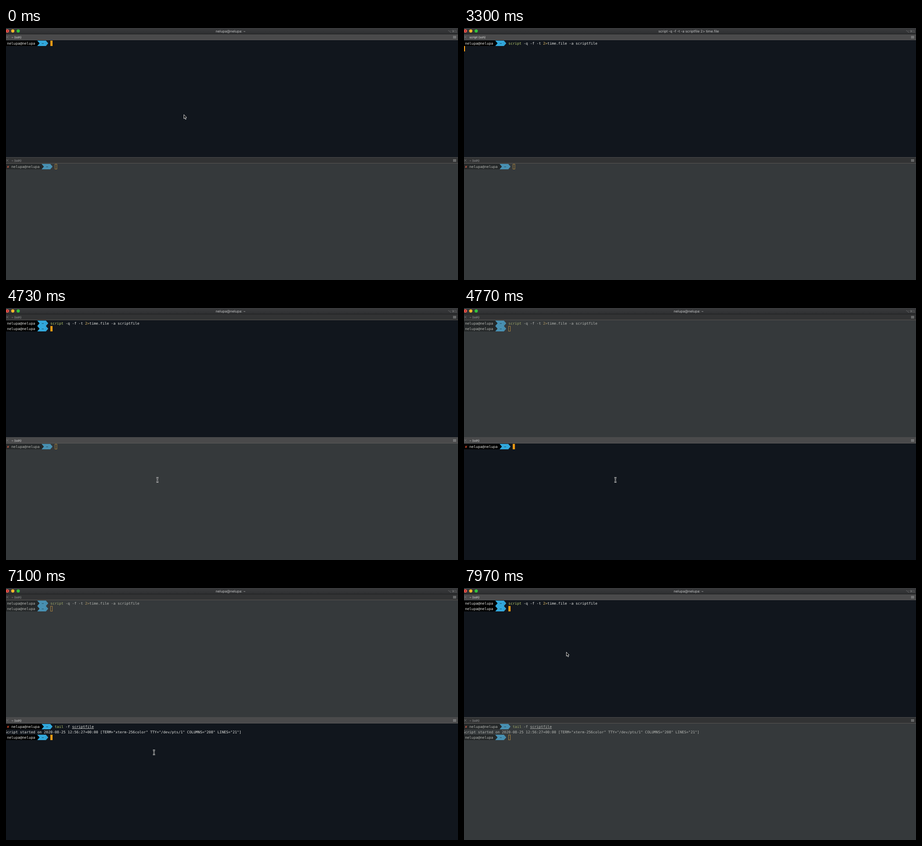
An HTML page with a canvas for the animation above (8000 ms loop, 1000 px wide and 560 px high).

```html
<!DOCTYPE html>
<html lang="en">
<head>
<meta charset="utf-8">
<title>Terminal session</title>
<style>
  html, body { margin: 0; width: 100%; height: 100%; overflow: hidden; background: #11161d; }
  canvas { display: block; width: 1000px; height: 560px; }
</style>
</head>
<body>
<canvas id="stage"></canvas>
<script>
const W = 1000, H = 560, LOOP = 8000;
const CELL = 4.8, ROW = 12, LEFT = -2.6;
const MONO = '7.97px "DejaVu Sans Mono", monospace';
const UI = 'Inter, sans-serif';
const HOST = 'nelupa@nelupa';
const TAIL = 'tail -f scriptfile';
const HEADER = 'Script started on 2020-08-25 12:56:27+00:00 ' +
  '[TERM="xterm-256color" TTY="/dev/pts/1" COLUMNS="208" LINES="21"]';

const LIT = { bg: '#11161d', seg: '#000', blue: '#32a8dc', text: '#e6e7e4', tilde: '#0a1a22',
  cmd: '#b9cd6c', bad: '#e2502f', redir: '#e3bd68', cursor: '#f59c14' };
const DIM = { bg: '#35393b', seg: '#242728', blue: '#4890b2', text: '#b6b8b4', tilde: '#15262f',
  cmd: '#9ea868', bad: '#c5604a', redir: '#b39a62', cursor: '#a58040' };

// Moments of the session, in ms
const T = { hide: 430, recall: 2100, run: 3000, prompt: 3650, show: 4230, arrive: 4690,
  tabDown: 4700, paneDown: 4770, type: 5180, typed: 6200, enter: 6530, output: 6570,
  back: 6970, rest: 7780, paneUp: 7960 };

const canvas = document.getElementById('stage');
const ratio = window.devicePixelRatio || 1;
canvas.width = W * ratio;
canvas.height = H * ratio;
const g = canvas.getContext('2d');
g.scale(ratio, ratio);
g.textRendering = 'geometricPrecision';

const colX = col => LEFT + col * CELL;

function rect(x, y, w, h, color) {
  g.fillStyle = color;
  g.fillRect(x, y, w, h);
}

function poly(points, color) {
  g.fillStyle = color;
  g.beginPath();
  points.forEach(([x, y]) => g.lineTo(x, y));
  g.closePath();
  g.fill();
}

function label(str, x, y, size, color, align = 'left', family = UI) {
  g.font = size + 'px ' + family;
  g.textAlign = align;
  g.fillStyle = color;
  g.fillText(str, x, y);
}

function put(str, col, y, color) {
  g.font = MONO;
  g.textAlign = 'left';
  g.fillStyle = color;
  [...str].forEach((ch, i) => { if (ch !== ' ') g.fillText(ch, colX(col + i), y + 9); });
}

// Draws a prompt and returns the column where input starts
function prompt(y, c, failed) {
  const name = failed ? 3 : 1, edge = name + 14;
  const x = colX(edge), end = colX(edge + 4);
  rect(0, y, x, ROW, c.seg);
  rect(x, y, end - x, ROW, c.blue);
  poly([[x - .3, y], [x + CELL, y + ROW / 2], [x - .3, y + ROW]], c.seg);
  poly([[end - .3, y], [end + CELL, y + ROW / 2], [end - .3, y + ROW]], c.blue);
  if (failed) put('✘', 1, y, c.bad);
  put(HOST, name, y, c.text);
  put('~', edge + 2, y, c.tilde);
  return edge + 6;
}

function cursor(col, y, c) {
  if (c === LIT) return rect(colX(col), y, CELL, ROW, c.cursor);
  g.strokeStyle = c.cursor;
  g.lineWidth = 1;
  g.strokeRect(Math.round(colX(col)) + .5, y + .5, 4, ROW - 1);
}

function titleBar(t) {
  const fill = g.createLinearGradient(0, 0, 0, 13);
  fill.addColorStop(0, '#3a3b3d');
  fill.addColorStop(1, '#2e2f31');
  rect(0, 0, W, 13, fill);
  rect(0, 13, W, 1, '#1d1e1f');
  ['#f4574f', '#f6b62c', '#32c23c'].forEach((color, i) => {
    g.fillStyle = color;
    g.beginPath();
    g.arc(3 + i * 12, 6.6, 3.6, 0, 7);
    g.fill();
  });
  g.fillStyle = '#5c0f0c';
  g.beginPath();
  g.arc(3, 6.6, 1.2, 0, 7);
  g.fill();
  const running = t >= T.run && t < T.prompt;
  label(running ? 'script -q -f -t -a scriptfile 2> time.file' : HOST + ': ~',
    497, 9.5, 7.7, '#c3c4c5', 'center');
  label('⌥⌘1', 998, 9.5, 7.4, '#7b7c7d', 'right', '"DejaVu Sans", sans-serif');
}

function tabBar(y, name, active) {
  rect(0, y, W, 12, active ? '#4a4a4b' : '#323334');
  rect(0, y + 12, W, 1, active ? '#5c5b5a' : '#5a5653');
  const mid = y + 6.3;
  g.strokeStyle = '#7c7d7e';
  g.lineWidth = .8;
  g.beginPath();
  g.moveTo(.3, mid - 2.6); g.lineTo(5.4, mid + 2.6);
  g.moveTo(5.4, mid - 2.6); g.lineTo(.3, mid + 2.6);
  g.stroke();
  label(name + ' (ssh)', 12, y + 8.8, 6.7, active ? '#ededed' : '#a9aaab');
  for (let i = -1; i < 2; i++) rect(989, mid - .4 + i * 2, 7, .9, '#a2a3a4');
}

function upperPane(t, c) {
  rect(0, 27, W, 260, c.bg);
  const y = 28;
  const col = prompt(y, c, false);
  if (t < T.recall) return cursor(col, y, c);
  put('script', col, y, c.cmd);
  put('-q -f -t', col + 7, y, c.text);
  put('2>', col + 16, y, c.redir);
  put('time.file -a scriptfile', col + 18, y, c.text);
  if (t < T.run) cursor(col + 41, y, c);
  else if (t < T.prompt) cursor(0, y + ROW, c);
  else cursor(prompt(y + ROW, c, false), y + ROW, c);
}

function lowerPane(t, c) {
  rect(0, 301, W, H - 301, c.bg);
  const y = 302;
  const col = prompt(y, c, true);
  const part = (t - T.type) / (T.typed - T.type);
  const count = t < T.type ? 0 : Math.min(TAIL.length, 1 + Math.floor(part * (TAIL.length - 1)));
  put(TAIL.slice(0, Math.min(count, 4)), col, y, count < 4 ? c.bad : c.cmd);
  put(TAIL.slice(4, count), col + 4, y, c.text);
  if (count > 8) rect(colX(col + 8), y + 10, (count - 8) * CELL, .8, c.text);
  if (t < T.enter) return cursor(col + count, y, c);
  if (t < T.output) return cursor(0, y + ROW, c);
  put(HEADER, 0, y + ROW, c.text);
  cursor(prompt(y + 2 * ROW, c, false), y + 2 * ROW, c);
}

function arrow(x, y) {
  g.beginPath();
  [[0, 0], [0, 9], [2, 7.2], [3.5, 10.6], [5, 10], [3.6, 6.7], [6.3, 6.5]]
    .forEach(([dx, dy]) => g.lineTo(x + .5 + dx, y + .5 + dy));
  g.closePath();
  g.fillStyle = '#0a0a0a';
  g.fill();
  g.strokeStyle = '#f0f0f0';
  g.lineWidth = .9;
  g.stroke();
}

function beam(x, y) {
  const path = () => {
    g.beginPath();
    g.moveTo(x - 2.3, y - 5); g.quadraticCurveTo(x, y - 5, x, y - 3);
    g.quadraticCurveTo(x, y - 5, x + 2.3, y - 5);
    g.moveTo(x - 2.3, y + 5); g.quadraticCurveTo(x, y + 5, x, y + 3);
    g.quadraticCurveTo(x, y + 5, x + 2.3, y + 5);
    g.moveTo(x, y - 4); g.lineTo(x, y + 4);
    g.moveTo(x - 1.3, y + .5); g.lineTo(x + 1.3, y + .5);
  };
  for (const [color, width] of [['#e8e8e8', 2.4], ['#15181a', .9]]) {
    path();
    g.strokeStyle = color;
    g.lineWidth = width;
    g.stroke();
  }
}

function pointer(t) {
  const glide = (from, to, a, b) => {
    const p = Math.min(1, Math.max(0, (t - a) / (b - a)));
    const e = p * p * (3 - 2 * p);
    return from.map((v, i) => v + (to[i] - v) * e);
  };
  let pos;
  if (t < T.hide) pos = [393, 192];
  else if (t >= T.show && t < T.type) pos = glide([393, 192], [335, 382], T.show, T.arrive);
  else if (t >= T.back) pos = glide([335, 382], [226, 142], T.back, T.rest);
  else return;
  (pos[1] > 294 ? beam : arrow)(...pos);
}

function draw() {
  const t = performance.now() % LOOP;
  const lowerTab = t >= T.tabDown && t < T.paneUp;
  const lowerLit = t >= T.paneDown && t < T.paneUp;
  upperPane(t, lowerLit ? DIM : LIT);
  lowerPane(t, lowerLit ? LIT : DIM);
  titleBar(t);
  tabBar(14, t >= T.run && t < T.prompt ? 'script' : '~', !lowerTab);
  rect(0, 287, W, 1, '#4b4c4d');
  tabBar(288, '~', lowerTab);
  pointer(t);
  requestAnimationFrame(draw);
}
draw();
</script>
</body>
</html>
```
